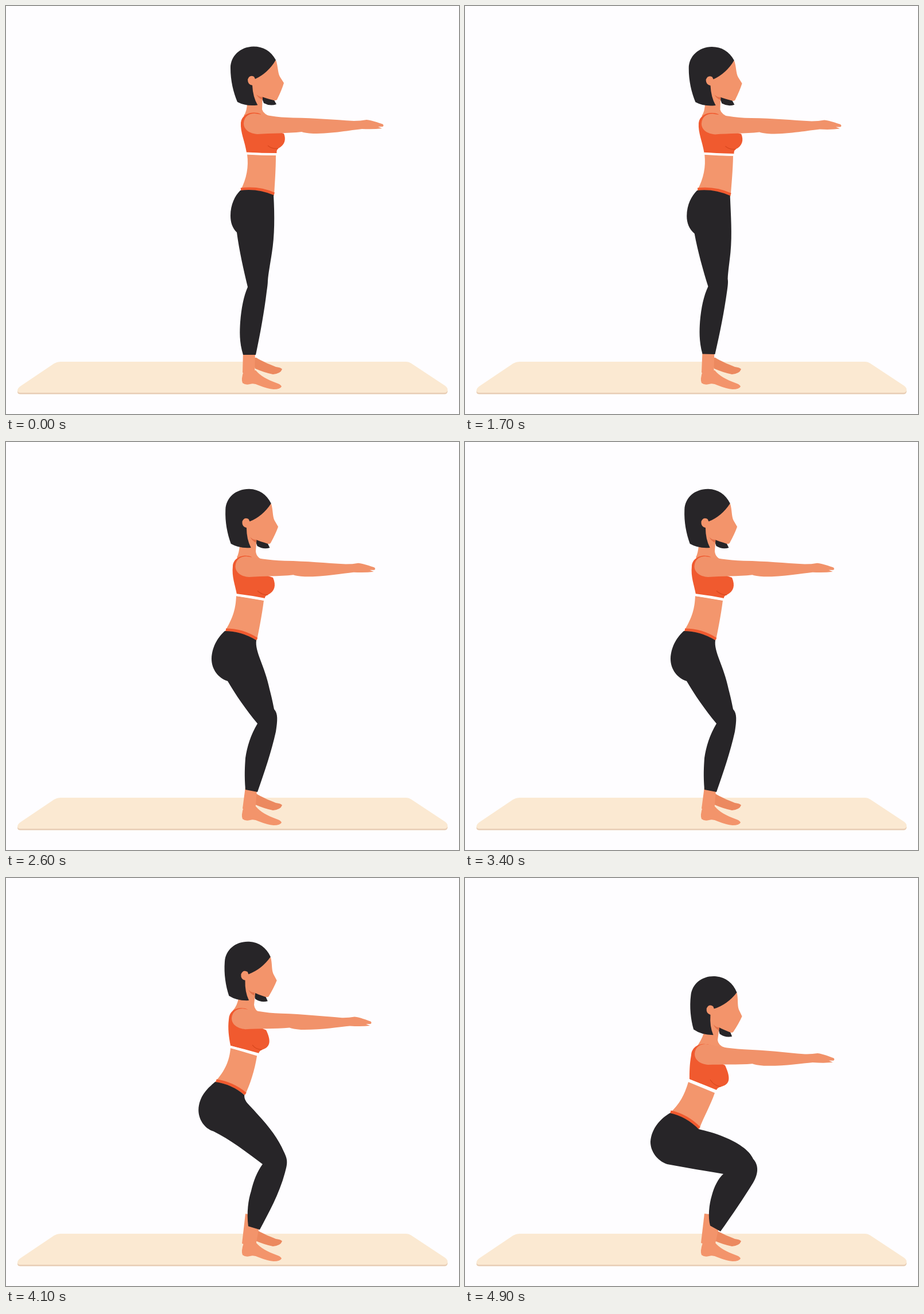
An HTML page with a canvas that plays this animation: 789 px wide and 710 px high, repeating every 5000 ms.

```html
<!DOCTYPE html>
<html lang="en">
<head>
<meta charset="utf-8">
<title>Squat</title>
<style>
html, body { margin: 0; width: 100%; height: 100%; overflow: hidden; background: #fefdff; }
canvas { display: block; }
</style>
</head>
<body>
<canvas id="stage" width="789" height="710"></canvas>
<script>
const ctx = document.getElementById('stage').getContext('2d');
const SKIN = '#f3946b', ARM = '#f1926a', BELLY = '#f3966d', ORANGE = '#f05a2f', BLACK = '#272528';

// Depth of the squat at each pose: standing, half, lower, deep
const DEPTHS = [0, 1, 1.4, 2];

// Each moving shape has one path per pose, all with the same commands
const ankle = [
  'M413 600 L424 600 L434 600 L433 645 L412 638 Z',
  'M417 600 L427 600 L437 604 L434 645 L412 638 Z',
  'M417 584 L430 586 L441 607 L434 645 L411 636 Z',
  'M417 584 L433 586 L442 609 L434 645 L411 635 Z'
];
const neck = [
  'M420 168 Q420 183 414 191 L440 204 L464 194 Q448 188 446 180 L447 150 Z',
  'M407 180 Q406 193 402 201 L425 214 L450 206 Q436 202 435 190 L437 163 Z',
  'M405 209 Q403 222 395 231 L418 244 L442 235 Q433 230 432 221 L435 192 Z',
  'M416 270 Q411 284 403 294 L425 306 L452 295 Q441 291 440 282 L444 252 Z'
];
const bra = [
  'M444 188 C430 182 411 187 409 203 C408 220 416 235 419 255 L472 257 Q470 252 474 248 C486 242 488 232 484 222 L444 210 Z',
  'M428 200 C415 194 396 200 395 216 C393 235 399 248 402 265 L451 273 Q450 268 456 266 C468 260 471 250 465 236 L425 222 Z',
  'M421 229 C407 223 389 228 388 246 C386 262 388 277 391 292 L440 306 Q440 302 446 299 C459 295 463 286 453 265 L418 250 Z',
  'M428 291 C414 285 395 291 394 308 C391 325 391 338 391 350 L438 369 Q439 365 446 363 C459 360 465 352 453 326 L425 312 Z'
];
const crease = [
  'M456 243 Q463 249 474 248',
  'M438 259 Q445 266 456 266',
  'M429 291 Q435 299 446 299',
  'M427 351 Q434 362 446 363'
];
const belly = [
  'M420 258 C423 280 419 300 409 320 L467 330 C468 310 470 285 470 260 Z',
  'M401 268 C400 290 396 305 381 330 L437 345 C441 325 446 300 449 276 Z',
  'M391 296 C389 318 382 335 364 355 L416 378 C425 360 433 335 437 310 Z',
  'M389 355 C382 378 374 393 357 409 L408 437 C416 415 428 395 435 374 Z'
];
const band = [
  'M419 256.5 Q445 258 472 258',
  'M401 266 Q426 269 451 274',
  'M390 294 Q415 300 441 307.5',
  'M390 352 Q414 361 438 371'
];
const belt = [
  'M409 319 Q440 315 467 327',
  'M383 327 Q412 327 437 343',
  'M366 353 Q394 357 417 376',
  'M358 407 Q386 413 408 435'
];
const pants = [
  'M408 321 Q438 317 466 329 C468 365 468 400 463 430 C460 450 457 465 456 478 C456 483 455 490 454 497 C450 530 443 570 435 607 L413 607 C406 585 407 565 408 550 C410 525 414 505 421 489 C414 460 406 425 402 394 C394 386 391 376 391 365 C391 345 399 330 408 321 Z',
  'M381 329 Q410 329 436 345 C433 365 451 390 459 430 C463 445 465 455 467 465 C474 472 473 485 470 504 C462 540 450 575 438 609 L417 605 C415 580 416 565 417 550 C420 530 426 510 438 490 C418 466 400 440 386 416 C370 411 358 396 358 377 C359 354 371 338 381 329 Z',
  'M364 355 Q393 359 415 378 C414 390 425 395 438 411 C458 432 475 455 484 476 C491 490 491 496 486 513 C476 550 458 582 442 612 L422 606 C419 582 422 560 427 545 C431 527 438 510 447 498 C420 478 390 455 361 441 C345 436 335 420 335 404 C336 380 350 367 364 355 Z',
  'M357 409 Q385 415 407 437 C420 440 436 444 452 451 C474 460 495 473 502 489 C512 500 511 515 502 530 C486 556 465 587 445 615 L427 605 C423 590 425 568 430 552 C434 537 441 523 450 515 C420 510 385 504 352 498 C335 492 323 476 323 459 C325 434 342 418 357 409 Z'
];

// Rigid parts: shift x, shift y, turn in degrees
const headMove = ['0 0 0', '-9.5 11.5 2.5', '-11.5 41 4.5', '0 101 7'];
const armMove = ['0 0 0', '-14.5 12 0.2', '-21 40.5 1', '-14 102 1.5'];

const mat = 'M95 619 H697 Q702 619 706 622 L765 661 Q770 665 769 669 Q768 673 764 673 H25 Q20 673 20 669 Q20 665 26 661 L84 622 Q89 619 95 619 Z';
const backFoot = 'M431 612 Q431 625 434 631 Q450 638 465 641 Q478 640 481 632 Q479 629 470 628 C455 622 446 618 436 612 Z';
const frontFoot = 'M414 635 Q409 650 412 656 Q417 660 425 658 Q432 656 440 660 Q455 666 466 667 Q478 667 480 662 Q478 658 471 656 C455 650 443 644 435 634 Z';
const hairTip = 'M444 156 L466 162 L471 171 Q460 175 449 169 Z';
const hair = 'M470 94 C461 78 448 70.5 431 70.5 C408 71 391 87 391 108 C391 130 396 150 403 167 Q418 175 438 172.5 L445 140 Z';
const face = 'M470 94 C474 105 473 115 477 123 L484 134 Q480 147 472 163 Q470 165 466 164 Q454 161 446 158 L438 172 Q430 158 429 138 Q421 137 421 128 Q424 119 432 123 L434 127 Q456 117 470 94 Z';
const jaw = 'M436 154 Q442 159 447 158 L447 163 Q440 161 436 154 Z';
const arm = 'M433 187 C450 189 470 194 500 194.5 C540 195 570 198 606 200 Q618 200 628 198 C638 199 648 203 656 205.5 Q659 208 656 210 L648 210 L655 213 Q640 215 620 214 C600 216 570 222 535 222 Q520 221 515 219 C490 222 460 221 438 223 C424 222 414 215 414 204 C415 192 423 187 433 187 Z';

const fill = (d, color) => {
  ctx.fillStyle = color;
  ctx.fill(new Path2D(d));
};
const line = (d, color, width) => {
  ctx.strokeStyle = color;
  ctx.lineWidth = width;
  ctx.stroke(new Path2D(d));
};

function blend(poses, depth) {
  const i = depth < 1 ? 0 : depth < 1.4 ? 1 : 2;
  const k = (depth - DEPTHS[i]) / (DEPTHS[i + 1] - DEPTHS[i]);
  const end = poses[i + 1].match(/-?[\d.]+/g);
  let n = 0;
  return poses[i].replace(/-?[\d.]+/g, v => (+v + (end[n++] - v) * k).toFixed(2));
}

function place(moves, depth, px, py, draw) {
  const [x, y, turn] = blend(moves, depth).split(' ').map(Number);
  ctx.save();
  ctx.translate(px + x, py + y);
  ctx.rotate(turn * Math.PI / 180);
  ctx.translate(-px, -py);
  draw();
  ctx.restore();
}

function ease(t, start, length) {
  const x = Math.min(1, Math.max(0, (t - start) / length));
  return x * x * (3 - 2 * x);
}

function drawScene(t) {
  const depth = ease(t, 1590, 460) + ease(t, 3913, 435);
  const shape = (poses, color) => fill(blend(poses, depth), color);
  const stroke = (poses, color, width) => line(blend(poses, depth), color, width);
  const head = draw => place(headMove, depth, 437, 125, draw);

  ctx.fillStyle = '#fefdff';
  ctx.fillRect(0, 0, 789, 710);
  ctx.save();
  ctx.translate(0, 2.5);
  fill(mat, '#e8cdb4');
  ctx.restore();
  fill(mat, '#fbe9d2');

  fill(backFoot, '#ec895f');
  shape(ankle, SKIN);
  fill(frontFoot, SKIN);

  // The body starts to sink slowly while the knees begin to bend
  ctx.save();
  ctx.translate(0, -Math.max(0, 10 * depth * (1 - depth)));
  head(() => fill(hairTip, BLACK));
  shape(neck, SKIN);
  shape(belly, BELLY);
  stroke(belt, ORANGE, 5);
  shape(pants, BLACK);
  shape(bra, ORANGE);
  stroke(crease, '#d8481f', 1.2);
  stroke(band, '#fff', 4);
  head(() => {
    fill(hair, BLACK);
    fill(face, SKIN);
    fill(jaw, '#e2714a');
  });
  place(armMove, depth, 433, 204, () => fill(arm, ARM));
  ctx.restore();
}

function tick(now) {
  drawScene(Math.floor(now % 5000 / 100) * 100);
  requestAnimationFrame(tick);
}
drawScene(0);
requestAnimationFrame(tick);
</script>
</body>
</html>
```
